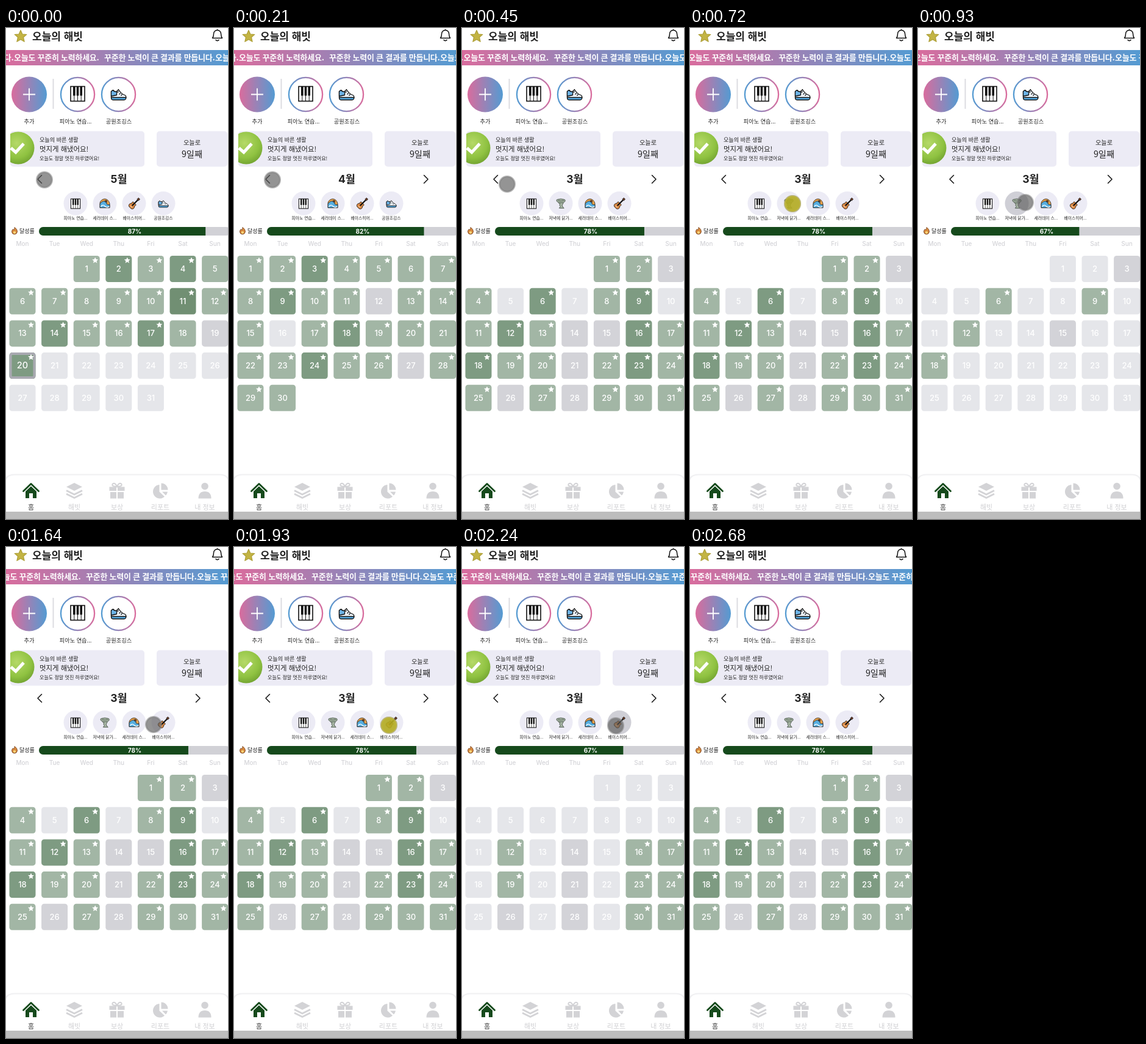
Write an HTML page that moves like this. It is 364 px wide and 802 px high and loops after 2710 ms.

```html
<!DOCTYPE html>
<html lang="ko">
<head>
<meta charset="utf-8">
<title>오늘의 해빗</title>
<style>
  html, body { margin: 0; width: 364px; height: 802px; overflow: hidden; background: #fff; }
  svg { display: block; }
  text { font-family: "Noto Sans CJK KR", Inter, sans-serif; fill: #222; }
  .num { font-family: Inter, "Noto Sans CJK KR", sans-serif; }
  .mid { text-anchor: middle; }
  .b { font-weight: 700; }
  .m { font-weight: 500; }
  .banner { font-size: 13px; font-weight: 700; fill: #fff; letter-spacing: -.25px; }
  .day { font-size: 13px; font-weight: 500; fill: #fff; }
  .week { font-size: 10px; font-weight: 500; fill: #d4d4d8; }
  .line { fill: none; stroke: #111; stroke-width: 1.5; stroke-linecap: round; stroke-linejoin: round; }
  #ticker { animation: ticker 2710ms linear infinite; }
  #cursor { animation: move 2710ms ease-in-out infinite; }
  #cursor circle { fill: rgba(92,92,92,.66); stroke: rgba(125,125,125,.55); stroke-width: 3; }
  #cursor .press { fill: rgba(198,188,22,.75); stroke: rgba(198,188,60,.5); }
  @keyframes ticker {
    0% { transform: translateX(13px); }
    16.61% { transform: translateX(2.5px); }
    34.32% { transform: translateX(-7px); }
    48.34% { transform: translateX(-12.5px); }
    60.52% { transform: translateX(-17px); }
    82.66% { transform: translateX(-25px); }
    98.89%, 100% { transform: translateX(-38px); }
  }
  @keyframes move {
    0%, 11% { transform: translate(63px, 248px); }
    16.61% { transform: translate(74px, 255px); }
    26% { transform: translate(168px, 287px); }
    34.32% { transform: translate(176px, 285px); }
    48.34%, 51% { transform: translate(168px, 288px); }
    60.52% { transform: translate(242px, 290px); }
    69% { transform: translate(254px, 291px); }
    82.66%, 90% { transform: translate(252px, 292px); }
    98%, 100% { transform: translate(225px, 830px); }
  }
</style>
</head>
<body>
<svg id="stage" width="364" height="802" viewBox="0 0 364 802">
  <defs>
    <linearGradient id="pb"><stop stop-color="#d96c9d"/><stop offset="1" stop-color="#549bd2"/></linearGradient>
    <linearGradient id="bp"><stop stop-color="#549bd2"/><stop offset="1" stop-color="#d96c9d"/></linearGradient>
    <radialGradient id="ball" cx=".45" cy=".35" r=".65">
      <stop stop-color="#b5d968"/><stop offset=".7" stop-color="#8fc241"/><stop offset="1" stop-color="#75a633"/>
    </radialGradient>
    <clipPath id="card"><rect x="7" y="168.5" width="220" height="58" rx="5"/></clipPath>
    <clipPath id="pill"><rect x="54" y="325" width="314" height="14" rx="7"/></clipPath>

    <path id="star" d="M0-5 1.5-1.7 5-1.5 2.3.9 3.1 4.5 0 2.6-3.1 4.5-2.3.9-5-1.5-1.5-1.7Z" stroke-linejoin="round"/>
    <g id="piano">
      <rect x="-11.5" y="-12" width="23" height="24" fill="#fff" stroke="#111" stroke-width="1.6"/>
      <path d="M-5.7-12V12M0-12V12M5.7-12V12" stroke="#111" stroke-width="1"/>
      <path d="M-5.7-12V3M0-12V3M5.7-12V3" stroke="#111" stroke-width="3.6"/>
    </g>
    <g id="shoe" stroke="#111" stroke-width="1.3" stroke-linejoin="round">
      <path d="M-12 5V-5L-9-7Q-6-3-3-5L0-8Q4-1 10 1 13 2 12 6Z" fill="#eef4fa"/>
      <path d="M-12-5-9-7Q-6-3-3-5V1L-12 3Z" fill="#6db4e8"/>
      <path d="M-12 5H12.5Q12 9 9 9H-9Q-12 9-12 5Z" fill="#58aee6"/>
      <path d="M0-5-2-3M3-2 1 0M6 0 4 2" fill="none"/>
    </g>
    <g id="wave" stroke="#222" stroke-width="1.2" stroke-linejoin="round">
      <path d="M-12 10V-3Q-9-11 0-12 9-11 12-1V10Z" fill="#eba34b"/>
      <path d="M-12 10V0Q-6-8 2-6 7-3 4 0 8 4 12 2V10Z" fill="#56aee0"/>
      <path d="M-10 7Q-5 1 0 6T11 7" fill="none" stroke="#fff" stroke-width="2"/>
      <circle cx="3" cy="-6" r="2.5" fill="#7a4b2e"/>
    </g>
    <g id="guitar" transform="rotate(45)" stroke="#111" stroke-width="1.2">
      <path d="M0 14C-9 15-9 6-5 4-8-2-3-3 0-1 3-3 8-2 5 4 9 6 9 15 0 14Z" fill="#d98742"/>
      <path d="M0 7V-13" stroke-width="3.4"/>
      <path d="M-2.5-13H2.5V-18H-2.5Z" fill="#6b3b24"/>
      <path d="M-3 10H3" stroke="#fff"/>
    </g>
    <g id="twist" stroke="#3d4a40" stroke-width="1.3" stroke-linejoin="round">
      <path d="M-10-10Q0-14 10-10 13-5 6-3 7 1 3 3L5 8 8 11H-4L-1 7Q-5 3-2 0-7-1-6-4-12-5-10-10Z" fill="#a9b8a6"/>
      <path d="M-7-8Q0-5 8-8M-4-3Q1-1 5-3" fill="none"/>
    </g>
  </defs>

  <!-- header -->
  <use href="#star" transform="translate(24 13.5) scale(1.95)" fill="#c3b443" stroke="#b0a23c" stroke-width=".7"/>
  <text class="b" x="43" y="19.5" font-size="17">오늘의 해빗</text>
  <path class="line" d="M338.5 16.5Q340.5 14 340.5 9.5A6 6 0 0 1 352.5 9.5Q352.5 14 354.5 16.5ZM344 19.5Q346.5 22 349 19.5M346.5 3.5V2.5"/>

  <!-- banner -->
  <rect y="36" width="364" height="25" fill="url(#pb)"/>
  <g id="ticker"></g>

  <!-- shortcuts -->
  <circle cx="38" cy="108.5" r="29" fill="url(#pb)"/>
  <path d="M28 108.5H48M38 98.5V118.5" stroke="#fff" stroke-width="1.8"/>
  <path d="M77.5 83V132" stroke="#dcdce1" stroke-width="2"/>
  <g fill="#fff" stroke="url(#bp)" stroke-width="2.3">
    <circle cx="117.5" cy="108.5" r="27.6"/><circle cx="184.5" cy="108.5" r="27.6"/>
  </g>
  <use href="#piano" x="117.5" y="107.5"/>
  <use href="#shoe" x="184.5" y="108.5"/>
  <g class="mid" font-size="9.2">
    <text x="38" y="155.5">추가</text>
    <text x="114" y="155.5">피아노 연습...</text>
    <text x="185" y="155.5">공원조깅스</text>
  </g>

  <!-- cards -->
  <g fill="#ecebf5">
    <rect x="7" y="168.5" width="220" height="58" rx="5"/><rect x="247" y="168.5" width="116" height="58" rx="5"/>
  </g>
  <g clip-path="url(#card)">
    <circle cx="20" cy="196" r="26.5" fill="url(#ball)"/>
    <path d="M8 196 16 203 29 189" fill="none" stroke="#fff" stroke-width="5"/>
  </g>
  <text x="55" y="186" font-size="9.1">오늘의 바른 생활</text>
  <text class="m" x="55" y="201.5" font-size="11.4">멋지게 해냈어요!</text>
  <text x="55" y="216" font-size="8.05">오늘도 정말 멋진 하루였어요!</text>
  <text class="mid" x="305" y="190.5" font-size="10.1">오늘로</text>
  <text class="mid m" x="305" y="211" font-size="14.2">9일째</text>

  <!-- progress -->
  <path d="M14 325.5Q19 329 18.5 333 17.5 337 14 337 10 337 9.5 333 9.5 330 11.5 328.5L12.5 330Q14.5 328 14 325.5Z" fill="#d98a3d" stroke="#6b3a1e" stroke-width=".8"/>
  <circle cx="14" cy="334" r="2" fill="#f6d77a"/>
  <text x="22" y="334.8" font-size="9">달성률</text>
  <rect x="54" y="325" width="314" height="14" rx="7" fill="#d1d1d6"/>
  <g id="weeks" class="mid"></g>
  <path class="line" d="M58.5 240.5 52 247 58.5 253.5"/>
  <g id="views"></g>

  <!-- tabs -->
  <path d="M-2 745Q-2 729.5 14 729.5H350Q366 729.5 366 745" fill="none" stroke="#f0f0f2" stroke-width="2"/>
  <g fill="#d3d3d6">
    <path d="M28.5 756.5 41 744.5 53.5 756.5" fill="none" stroke="#164a1c" stroke-width="2.8" stroke-linecap="round" stroke-linejoin="round"/>
    <path d="M32 757 41 748.5 50 757V768H44V760H38V768H32Z" fill="#164a1c"/>
    <path d="M112 743 125 749.5 112 756 99 749.5Z"/>
    <path d="M99 755.5 112 762 125 755.5M99 761 112 767.5 125 761" fill="none" stroke="#d3d3d6" stroke-width="2.8"/>
    <path d="M169.500 749.500H181V756H169.500ZM183 749.500H194.500V756H183ZM171 758H181V768.500H171ZM183 758H193V768.500H183Z"/>
    <path d="M182 749Q172 749 175 744.500 179 742 182 749 185 742 189 744.500 192 749 182 749Z" fill="none" stroke="#d3d3d6" stroke-width="2"/>
    <path d="M251.500 746V757.500L260 765.500A11.300 11.300 0 1 1 251.500 746Z"/>
    <path d="M254.500 743.500A11 11 0 0 1 265.500 754.500H254.500ZM256 757.500H265A11 11 0 0 1 262 763.500Z"/>
    <circle cx="326" cy="748.5" r="5.8"/>
    <path d="M315.500 768.500Q315.500 757 326 757 336.500 757 336.500 768.500Z"/>
  </g>
  <g id="tabs" class="mid m" font-size="11"></g>
  <rect y="790" width="364" height="12" fill="#bdbdbd"/>

  <g id="cursor"><circle r="12.5"/><circle class="press" r="12.5"/></g>
</svg>
<script>
const LOOP = 2710;
const byId = id => document.getElementById(id);
const label = (x, y, size, s, cls) => `<text class="${cls}" x="${x}" y="${y}" font-size="${size}">${s}</text>`;

const habits = {
  piano: '피아노 연습...', twist: '저녁에 닭가...', wave: '세러데이 스...',
  guitar: '베이스히어...', shoe: '공원조깅스'
};
const spring = ['piano', 'wave', 'guitar', 'shoe'];
const march = ['piano', 'twist', 'wave', 'guitar'];
const tone = { '.': '#e5e6ea', g: '#d3d3d8', l: '#a2b6a5', d: '#7e9b82', x: '#718f73', t: '#7e9b82' };

// days: one letter each, capitals carry a star; on: visible [start, end] spans in ms
const views = [
  { month: 5, first: 2, rate: 87, icons: spring, on: [[0, 90]],
    days: 'LDLDlLLlLLXLLDLLDlgT...........' },
  { month: 4, first: 0, rate: 82, icons: spring, on: [[90, 270]],
    days: 'LLDLLlLLDLLgLLL.LDLLlLLDLLgLLl' },
  { month: 3, first: 4, rate: 78, icons: march, on: [[270, 780], [1360, 1980], [2420, LOOP]],
    days: 'LLgL.D.LD.LDLggDLDLLgLDLLgLgLlL' },
  { month: 3, first: 4, rate: 67, icons: march, pick: 'twist', on: [[780, 1360]],
    days: '..g..L..L..L..g..L.............' },
  { month: 3, first: 4, rate: 67, icons: march, pick: 'guitar', on: [[1980, 2420]],
    days: '...........L.g.LL.L.g.LL.g.g.LL' }
];

function cell(code, i, first) {
  const n = i + first, x = 5.5 + n % 7 * 52.6, y = 372 + Math.floor(n / 7) * 52.7;
  const today = code === 'T', kind = code.toLowerCase();
  let s = `<rect x="${x}" y="${y}" width="43" height="43" rx="4.500" fill="${tone[kind]}"/>`;
  if (today) s += `<rect x="${x + 2}" y="${y + 2}" width="39" height="39" rx="3" fill="none" stroke="#a9a9b1" stroke-width="4"/>`;
  s += `<text class="num day mid" x="${x + 21.5}" y="${y + 26}"${today ? ' style="font-size:14.5px"' : ''}>${i + 1}</text>`;
  if (code !== kind) s += `<use href="#star" x="${x + 35.5}" y="${y + 7.5}" fill="#fff"/>`;
  return s;
}

function habit(name, i, pick) {
  const x = 114 + i * 48;
  return `<circle cx="${x}" cy="286.5" r="19.5" fill="${name === pick ? '#cfcfd6' : '#ecebf5'}"/>` +
    `<use href="#${name}" transform="translate(${x} 287) scale(.66)"/>` +
    label(x, 313, 6.8, habits[name], 'mid');
}

const page = v =>
  label(185, 253, 17.5, v.month + '월', 'num b mid') +
  (v.month < 5 ? '<path class="line" d="M311.5 240.5 318 247 311.5 253.5"/>' : '') +
  v.icons.map((name, i) => habit(name, i, v.pick)).join('') +
  `<rect x="54" y="325" width="${3.14 * v.rate}" height="14" fill="#164a1c" clip-path="url(#pill)"/>` +
  `<text class="num b mid" x="211" y="335.5" font-size="10" style="fill:#fff">${v.rate}%</text>` +
  [...v.days].map((c, i) => cell(c, i, v.first)).join('');

// Hard on/off switching as stepped keyframes
function blink(name, spans) {
  const at = (t, vis) => `${t / LOOP * 100}% { visibility: ${vis}; }`;
  const start = spans[0][0] ? at(0, 'hidden') : '';
  return `@keyframes ${name} { ${start} ${spans.map(([a, b]) =>
    at(a, 'visible') + (b < LOOP ? at(b, 'hidden') : '')).join(' ')} ${at(LOOP, spans.at(-1)[1] < LOOP ? 'hidden' : 'visible')} }`;
}
const stepped = name => `animation: ${name} ${LOOP}ms step-end infinite`;

byId('ticker').innerHTML = [-330, 0, 330].map(x =>
  `<text class="banner" x="${x}" y="52.7">오늘도 꾸준히 노력하세요.</text>` +
  `<text class="banner" x="${x + 148}" y="52.7">꾸준한 노력이 큰 결과를 만듭니다.</text>`).join('');

byId('weeks').innerHTML = ['Mon', 'Tue', 'Wed', 'Thu', 'Fri', 'Sat', 'Sun'].map((d, i) =>
  `<text class="num week" x="${27 + i * 52.6}" y="356">${d}</text>`).join('');

byId('tabs').innerHTML = ['홈', '해빗', '보상', '리포트', '내 정보'].map((s, i) =>
  `<text x="${[41, 112, 182, 253, 326][i]}" y="787" style="fill:${i ? '#d0d0d3' : '#444'}">${s}</text>`).join('');

byId('views').innerHTML = views.map((v, i) => `<g style="${stepped('view' + i)}">${page(v)}</g>`).join('');

const presses = [[60, 130], [230, 290], [720, 800], [1270, 1370], [1930, 2000], [2370, 2440]];
document.querySelector('.press').style.cssText = stepped('press');

const sheet = document.createElement('style');
sheet.textContent = views.map((v, i) => blink('view' + i, v.on)).join('\n') + blink('press', presses);
document.head.append(sheet);
</script>
</body>
</html>
```
